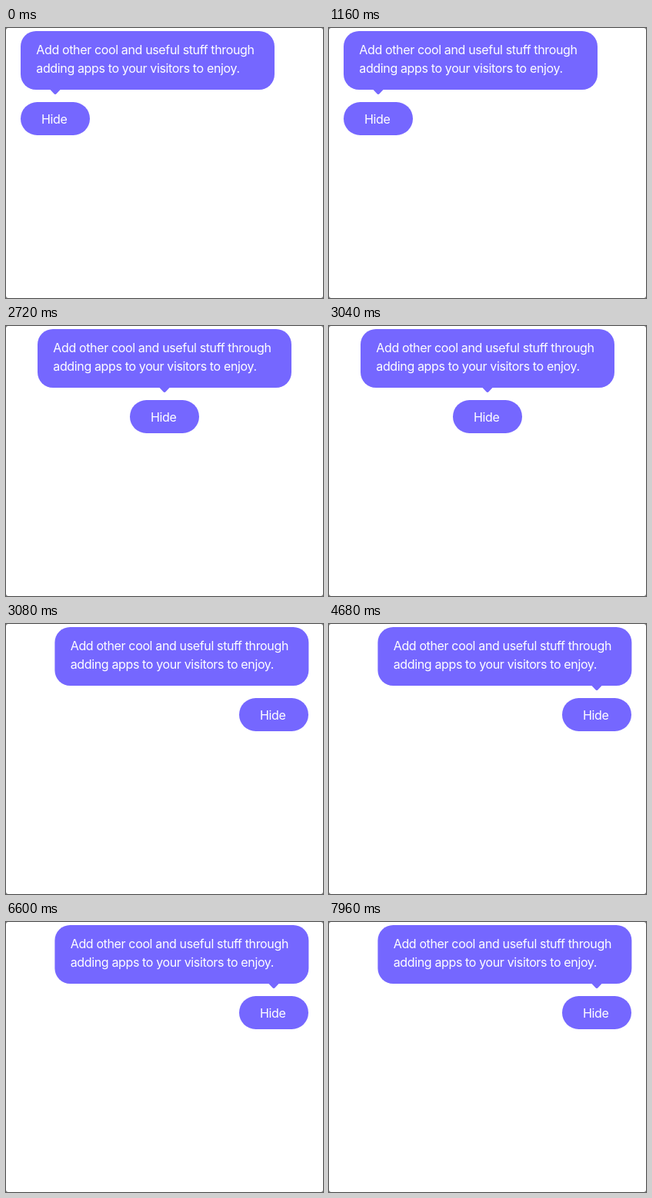
These frames come from a looping animation (412x350 px, 8000 ms). An HTML page:

```html
<!DOCTYPE html>
<html lang="en">
<head>
<meta charset="utf-8">
<title>Popover placement</title>
<style>
  html, body { margin: 0; width: 412px; height: 350px; overflow: hidden; background: #fff; }
  svg { display: block; }
  .shape { fill: #7567ff; }
  text { fill: #fff; font: 400 16px Inter, Roboto, sans-serif; letter-spacing: -.36px; }
  .edge { fill: #8a8a8a; }
</style>
</head>
<body>
<svg width="412" height="350" viewBox="0 0 412 350">
  <path class="edge" d="M0 0h2l-2 2zM412 0v2l-2-2zM0 350v-2l2 2zM412 350h-2l2-2z"/>
  <g id="bubble">
    <rect class="shape" y="4" width="330" height="76" rx="20"/>
    <text x="20.3" y="34.3">Add other cool and useful stuff through</text>
    <text x="20.3" y="58.3">adding apps to your visitors to enjoy.</text>
  </g>
  <path id="arrow" class="shape" d="M-8 79L-6.5 80L-2 84.8Q0 87.4 2 84.8L6.5 80L8 79Z"/>
  <path id="tail" class="shape" d="M378 79L380.5 80L388.5 86.2Q391.5 88 393 86.6V60L380 70Z"/>
  <g id="button">
    <rect class="shape" y="96" width="90" height="43" rx="21.5"/>
    <text x="27" y="123.8">Hide</text>
  </g>
</svg>
<script>
  const LOOP = 8000;

  // start time, bubble x, button x, pointer style
  const steps = [
    [0, 19, 19, "arrow"],
    [1240, 41, 161, "arrow"],
    [3080, 63.4, 303, "none"],
    [3120, 63.4, 303, "arrow"],
    [4880, 63.4, 303, "tail"],
    [6560, 63.4, 303, "arrow"]
  ];

  const [bubble, button, arrow, tail] =
    ["bubble", "button", "arrow", "tail"].map(id => document.getElementById(id));
  const moveTo = (el, x) => el.setAttribute("transform", `translate(${x})`);
  const show = (el, on) => el.setAttribute("visibility", on ? "visible" : "hidden");

  function draw(now) {
    const time = now % LOOP;
    const [, bubbleX, buttonX, pointer] = steps.filter(s => s[0] <= time).pop();
    moveTo(bubble, bubbleX);
    moveTo(button, buttonX);
    moveTo(arrow, buttonX + 45);
    show(arrow, pointer === "arrow");
    show(tail, pointer === "tail");
  }

  const start = performance.now();
  function tick() {
    draw(performance.now() - start);
    requestAnimationFrame(tick);
  }
  tick();
</script>
</body>
</html>
```
